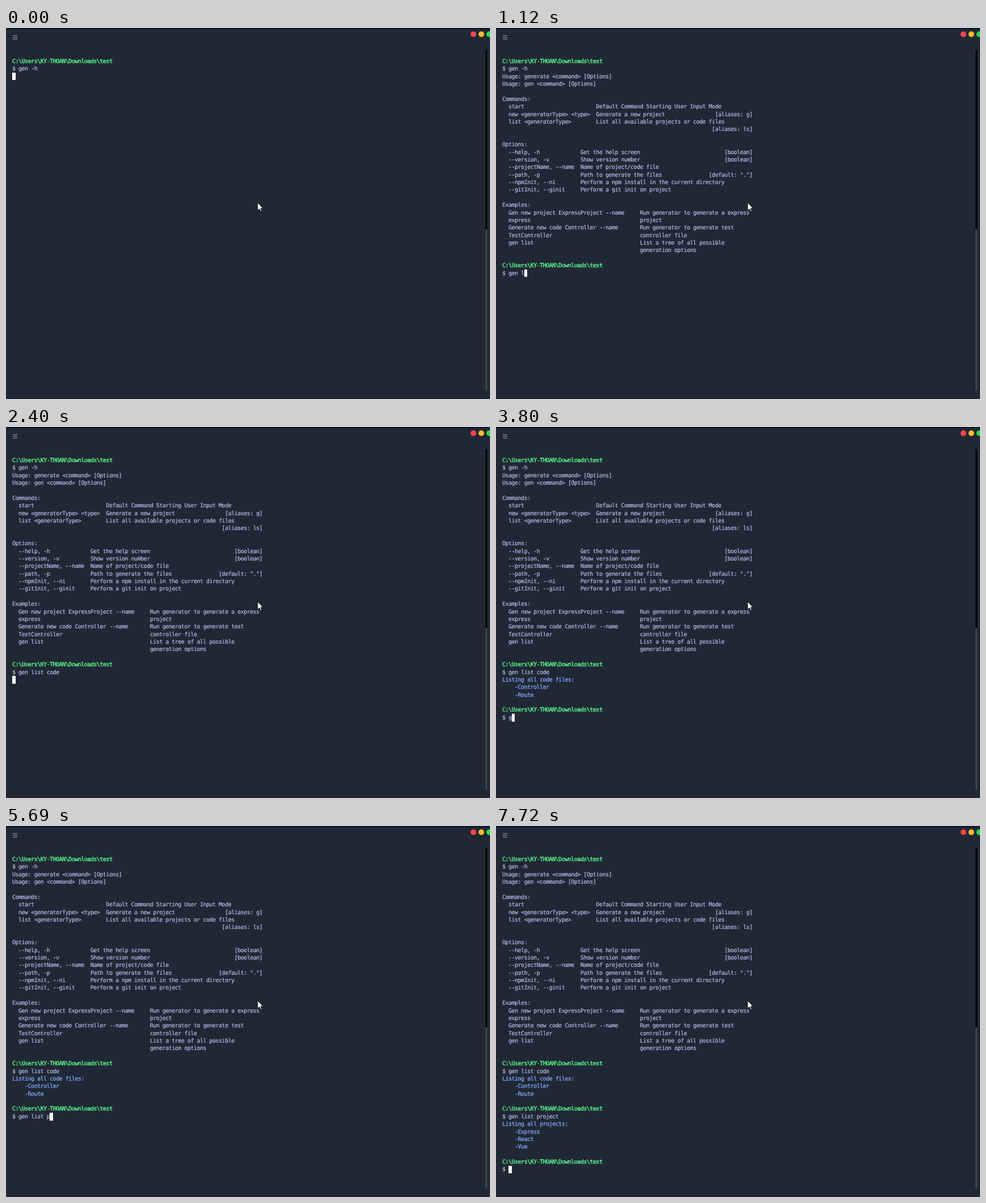
Animation of 854 by 656 pixels, one loop 8 s. Source, as an HTML page with a canvas:

```html
<!DOCTYPE html>
<html lang="en">
<head>
<meta charset="utf-8">
<title>Terminal</title>
<style>
  html, body { margin: 0; width: 100%; height: 100%; overflow: hidden; background: #212835; }
  #stage { position: relative; width: 854px; height: 656px; overflow: hidden; }
  canvas { position: absolute; left: 0; top: 0; }
  #term {
    position: absolute; left: 11px; top: 53px; margin: 0;
    font: 10px/13.39px "DejaVu Sans Mono", monospace; letter-spacing: -0.5px;
    text-rendering: geometricPrecision; font-variant-ligatures: none;
    color: #b7c5f4; white-space: pre; -webkit-text-stroke: 0.15px;
  }
  #term div { height: 13.39px; }
  .path { color: #5afb8d; -webkit-text-stroke: 0.4px; }
  .list { color: #82aaff; -webkit-text-stroke: 0.25px; }
  .sign { color: #c3c5cc; }
  #caret { position: absolute; width: 5.52px; height: 13.39px; background: #fff; }
</style>
</head>
<body>
<div id="stage">
  <pre id="term"></pre>
  <div id="caret"></div>
  <canvas id="chrome" width="854" height="656"></canvas>
</div>
<script>
const LOOP = 8000, LEFT = 11, TOP = 52, CELL = 5.52, ROW = 13.39;
const PATH = 'C:\\Users\\KY-THOAN\\Downloads\\test';
const PROMPT = '\n' + PATH + '\n$ ';

// One table line: label, description at a column, tag flush with column 80.
const row = (col, label, text, tag = '') =>
  ('  ' + label).padEnd(col) + (tag ? text.padEnd(80 - col - tag.length) + tag : text);
const command = (...cells) => row(30, ...cells);
const option = (...cells) => row(25, ...cells);
const example = (...cells) => row(44, ...cells);

const help = [
  'Usage: generate <command> [Options]',
  'Usage: gen <command> [Options]',
  '',
  'Commands:',
  command('start', 'Default Command Starting User Input Mode'),
  command('new <generatorType> <type>', 'Generate a new project', '[aliases: g]'),
  command('list <generatorType>', 'List all available projects or code files'),
  command('', '', '[aliases: ls]'),
  '',
  'Options:',
  option('--help, -h', 'Get the help screen', '[boolean]'),
  option('--version, -v', 'Show version number', '[boolean]'),
  option('--projectName, --name', 'Name of project/code file'),
  option('--path, -p', 'Path to generate the files', '[default: "."]'),
  option('--npmInit, --ni', 'Perform a npm install in the current directory'),
  option('--gitInit, --ginit', 'Perform a git init on project'),
  '',
  'Examples:',
  example('Gen new project ExpressProject --name', 'Run generator to generate a express'),
  example('express', 'project'),
  example('Generate new code Controller --name', 'Run generator to generate test'),
  example('TestController', 'controller file'),
  example('gen list', 'List a tree of all possible'),
  example('', 'generation options'),
  ''
].join('\n');

const events = [];
const print = (time, text) => events.push({ time, text });
const type = (text, times) => times.forEach((time, i) => print(time, text[i]));

print(0, PATH + '\n$ gen -h\n');
print(90, help);
print(140, PROMPT);
type('gen list code\n',
  [670, 780, 880, 1040, 1120, 1180, 1210, 1400, 1830, 2040, 2100, 2260, 2330, 2400]);
print(3060, 'Listing all code files:\n    -Controller\n    -Route\n');
print(3080, PROMPT);
type('gen list project\n',
  [3800, 3850, 3940, 4120, 4590, 4650, 4710, 4920, 5100,
   5690, 5750, 5850, 5950, 6050, 6260, 6570, 6970]);
print(7690, 'Listing all projects:\n    -Express\n    -React\n    -Vue\n');
print(7720, PROMPT);

const term = document.getElementById('term');
const caret = document.getElementById('caret');

function span(text, kind) {
  const el = document.createElement('span');
  el.className = kind;
  el.textContent = text;
  return el;
}

function lineNode(text) {
  const el = document.createElement('div');
  if (text.startsWith('$')) el.append(span('$', 'sign'), text.slice(1));
  else if (text === PATH) el.append(span(text, 'path'));
  else if (/^(Listing| {4}-)/.test(text)) el.append(span(text, 'list'));
  else el.append(text);
  return el;
}

let shown = -1;
function render(time) {
  const past = events.filter(e => e.time <= time);
  if (past.length === shown) return;
  shown = past.length;
  const lines = past.map(e => e.text).join('').split('\n');
  term.replaceChildren(...lines.map(lineNode));
  const last = lines.length - 1;
  caret.style.left = LEFT + lines[last].length * CELL + 'px';
  caret.style.top = TOP + last * ROW + 'px';
}

function drawChrome() {
  const ctx = document.getElementById('chrome').getContext('2d');
  const rect = (color, x, y, w, h) => {
    ctx.fillStyle = color;
    ctx.fillRect(x, y, w, h);
  };
  rect('#04142a', 0, 0, 854, 2);
  for (const y of [13, 16, 19]) rect('#9a9ea6', 12, y, 8, 1);
  rect('#000', 846, 39, 3, 317);
  rect('#464646', 846, 356, 3, 285);
  ['#fc4652', '#fdbc2c', '#2bd948'].forEach((color, i) => {
    ctx.fillStyle = color;
    ctx.beginPath();
    ctx.arc(824.7 + i * 14, 11, 5, 0, Math.PI * 2);
    ctx.fill();
  });
  const pointer = new Path2D('M444 308.6v14.2l3.2-3 2.1 4.6 2-.9-2-4.5h4z');
  ctx.fillStyle = '#fff';
  ctx.fill(pointer);
  ctx.strokeStyle = '#0a0c10';
  ctx.lineWidth = 0.9;
  ctx.stroke(pointer);
}

const start = performance.now();
function tick() {
  render((performance.now() - start) % LOOP);
  requestAnimationFrame(tick);
}
drawChrome();
render(0);
tick();
</script>
</body>
</html>
```
